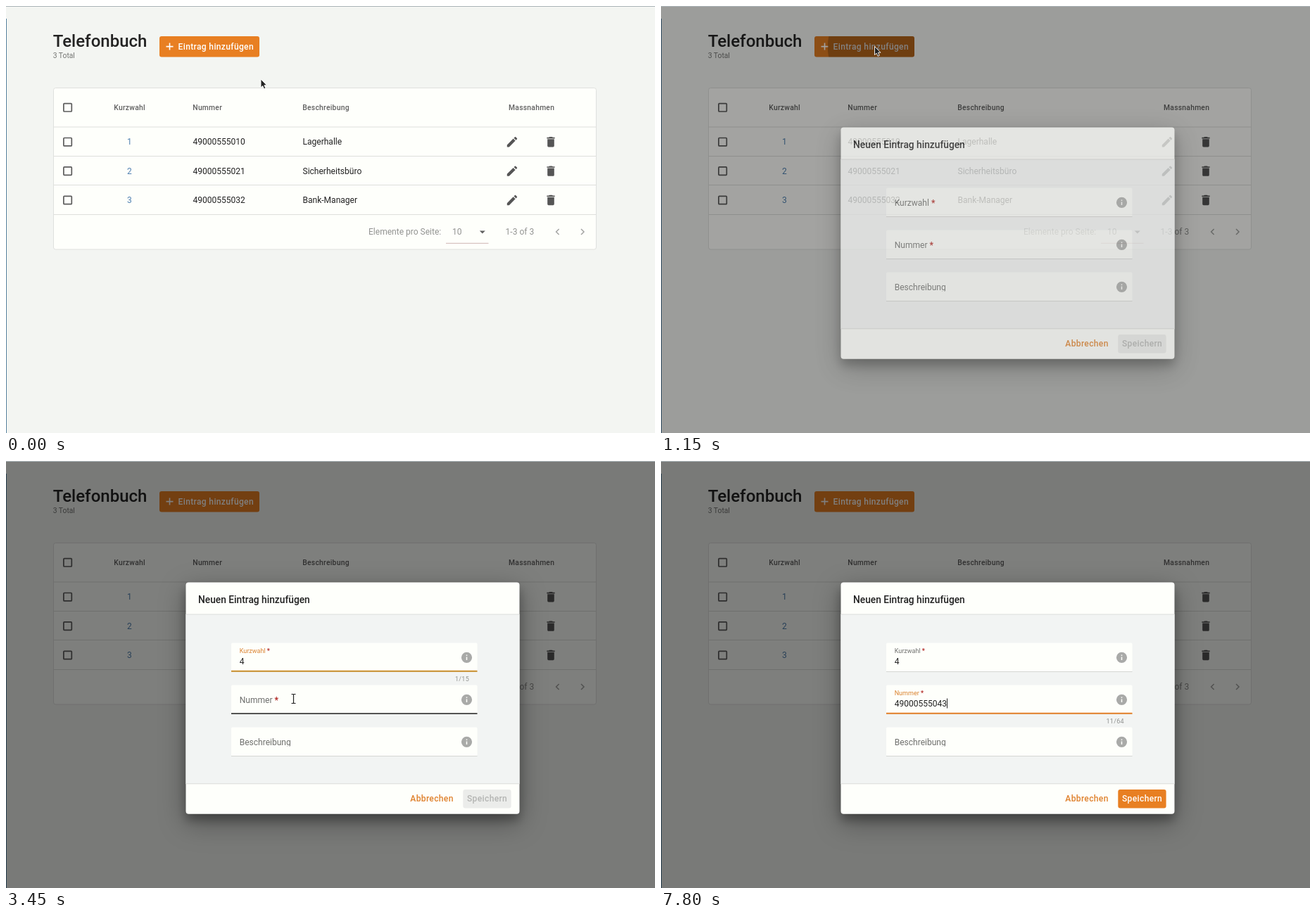
Recreate the animation shown at these times as an HTML page. Size 922 by 607 pixels, loop 8 s.

```html
<!DOCTYPE html>
<html lang="de">
<head>
<meta charset="utf-8">
<title>Telefonbuch</title>
<style>
html, body { margin: 0; width: 100%; height: 100%; overflow: hidden; background: #f3f5f2; }
svg { display: block; font: 12.04px Roboto, sans-serif; }
.medium { font-weight: 500; }
.head { font-weight: 500; font-size: 10.32px; letter-spacing: .26px; }
.button { font-weight: 500; letter-spacing: .35px; }
.dialog { filter: drop-shadow(0 9px 7px #0004) drop-shadow(0 10px 18px #0005); }
</style>
</head>
<body>
<svg id="stage" width="922" height="607" viewBox="0 0 922 607"></svg>
<script>
const LOOP = 8000, STEP = 50;
const ORANGE = '#e87f22', PAPER = '#fefffb', INK = '#222';
const ICONS = {
  edit: 'M3 17.25V21h3.75L17.81 9.94l-3.75-3.75zM20.71 7.04c.39-.39.39-1.02 0-1.41l-2.34-2.34c-.39-.39-1.02-.39-1.41 0l-1.83 1.83 3.75 3.75z',
  trash: 'M6 19c0 1.1.9 2 2 2h8c1.1 0 2-.9 2-2V7H6zM19 4h-3.5l-1-1h-5l-1 1H5v2h14z',
  info: 'M12 2a10 10 0 1 0 0 20 10 10 0 0 0 0-20zm1 15h-2v-6h2zm0-8h-2V7h2z'
};
const ROWS = [['49000555010', 'Lagerhalle'], ['49000555021', 'Sicherheitsbüro'], ['49000555032', 'Bank-Manager']];
const TYPED = '49000555043';
const KEY_TIMES = [4500, 4900, 5250, 5600, 6000, 6200, 6450, 6750, 7000, 7300, 7800];
const POINTER = [[0, 362, 104], [350, 362, 104], [400, 353, 100], [550, 353, 100], [800, 305, 58], [1100, 305, 58],
  [1200, 302, 57], [1350, 302, 57], [1800, 409, 256], [1950, 413, 281], [2900, 413, 281], [3450, 408.5, 338], [3550, 409.5, 344.5]];

const clamp = x => Math.max(0, Math.min(1, x));
const mix = (a, b, p) => a + (b - a) * p;
const ease = (t, from, to) => { const x = clamp((t - from) / (to - from)); return x * x * (3 - 2 * x); };
const blend = (a, b, p) => `color-mix(in srgb, ${b} ${p * 100}%, ${a})`;

const rect = (x, y, w, h, fill, more = '') => `<rect x="${x}" y="${y}" width="${w}" height="${h}" fill="${fill}" ${more}/>`;
const text = (x, y, s, fill, more = '') => `<text x="${x}" y="${y}" fill="${fill}" ${more}>${s}</text>`;
const line = (d, color, width = 1) => `<path d="${d}" fill="none" stroke="${color}" stroke-width="${width}"/>`;
const icon = (name, x, y, size, fill) =>
  `<path transform="translate(${x} ${y}) scale(${size}) translate(-12 -12)" d="${ICONS[name]}" fill="${fill}"/>`;

const checkbox = y => rect(81.9, y - 5.7, 11.4, 11.4, 'none', 'rx="1" stroke="#5c5c5c" stroke-width="1.7"');
const tableRow = ([number, label], i) => {
  const y = 193.2 + 41.4 * i;
  return checkbox(y) +
    text(175.5, y + 4, i + 1, '#4f80b0', 'text-anchor="middle"') +
    text(265.5, y + 4, number, INK) + text(421.5, y + 4, label, INK) +
    icon('edit', 719, y, .8, '#555') + icon('trash', 774, y, .8, '#555') +
    line(`M68 ${Math.round(y + 20.5) - .5}H838`, '#dedfdc');
};
const header = (x, s) => text(x, 148.2, s, '#606060', 'class="head"');

const PAGE = rect(0, 0, 922, 607, '#f3f5f2') + rect(0, 18, 1, 589, '#55809f') +
  text(66.7, 58, 'Telefonbuch', INK, 'class="medium" font-size="24"') +
  text(66.7, 74, '3 Total', '#747573', 'font-size="10.32"') +
  rect(67.5, 116.5, 771, 229.5, PAPER, 'rx="3" stroke="#dfe0de"') +
  checkbox(144.3) + header(153.3, 'Kurzwahl') + header(265.3, 'Nummer') +
  header(421.3, 'Beschreibung') + header(714, 'Massnahmen') +
  line('M68 172H838', '#dedfdc') + ROWS.map(tableRow).join('') +
  text(515, 325, 'Elemente pro Seite:', '#929391') + text(634, 324.5, '10', '#929391') +
  line('M625 337.3H685.5', '#cfb5b3') + '<path d="M672.8 319.5h8l-4 4z" fill="#606060"/>' +
  text(709.6, 325, '1-3 of 3', '#929391') +
  line('M785.6 317l-4 4 4 4M817 317l4 4-4 4', '#a4a5a3', 1.5);

const SHELL = rect(255.5, 172.5, 474, 329.3, PAPER, 'rx="4" class="dialog"') +
  rect(255.5, 218, 474, 241, '#f2f4f3') +
  line('M255.5 218H729.5M255.5 458.8H729.5', '#dcdddb') +
  text(273, 202.3, 'Neuen Eintrag hinzufügen', INK, 'class="medium" font-size="13.76"') +
  text(574.3, 484.3, 'Abbrechen', '#df812c', 'class="button"');

function pointerAt(t) {
  const i = POINTER.findIndex(k => k[0] > t);
  if (i < 0) return POINTER.at(-1).slice(1);
  const [a, b] = [POINTER[i - 1], POINTER[i]];
  const p = ease(t, a[0], b[0]);
  return [mix(a[1], b[1], p), mix(a[2], b[2], p)];
}

function addButton(t) {
  const radius = 108 * (1 - Math.exp(-Math.max(0, t - 1000) / 150));
  const ripple = t < 1000 ? 0 : .22 * (1 - ease(t, 1050, 1750));
  const hover = .05 * ease(t, 600, 800) * (1 - ease(t, 1350, 1600));
  return rect(218, 43, 142, 29.6, ORANGE, 'rx="3"') +
    rect(218, 43, 142, 29.6, '#000', `rx="3" opacity="${hover}"`) +
    line('M227.5 57.6h10M232.5 52.6v10', '#fff', 1.6) +
    text(244.6, 62.2, 'Eintrag hinzufügen', '#fff', 'class="button"') +
    '<clipPath id="pill"><rect x="218" y="43" width="142" height="29.6" rx="3"/></clipPath>' +
    `<circle cx="305" cy="58" r="${radius}" opacity="${ripple}" clip-path="url(#pill)"/>`;
}

function field(y, { label, required, value = '', max, focus = 0, float = 0, hover, accent, caret }) {
  const size = mix(12.04, 9.03, float);
  const star = required ? ' <tspan fill="#b02420" font-weight="700">*</tspan>' : '';
  let out = rect(320, y, 349.5, 41, PAPER, 'rx="2"') + line(`M320 ${y + 41}H669.5`, '#d5d6d4');
  if (hover) out += line(`M320 ${y + 40.5}H669.5`, INK, 1.7);
  if (focus) {
    const half = 174.75 * focus;
    out += line(`M${494.75 - half} ${y + 40.3}H${494.75 + half}`, accent, 2) +
      text(658, y + 54, `${value.length}/${max}`, '#929391',
        `text-anchor="end" font-size="9.03" letter-spacing=".3" opacity="${focus}"`);
  }
  out += text(331.7, y + mix(25.8, 14.7, float), label + star, blend('#6e6f6d', '#db8230', focus), `font-size="${size}"`) +
    text(331.7, y + 30.5, value, INK) + icon('info', 654.5, y + 20.8, .76, '#a9aaa8');
  if (!required) out += rect(331, y + 27, 80, 5, PAPER);
  if (caret) out += rect(Math.round(331.8 + value.length * 6.77), y + 19, 1, 14, INK);
  return out;
}

function dialog(t, py) {
  const first = ease(t, 2050, 2250), second = ease(t, 3650, 3850);
  const active = ease(t, 4450, 4700);
  const count = KEY_TIMES.filter(k => k <= t).length;
  return SHELL +
    field(258.5, { label: 'Kurzwahl', required: true, value: t < 2900 ? '' : '4', max: 15,
      focus: second ? 0 : first, float: first, accent: '#cb8f2c',
      hover: t >= 1850 && py < 300 && first < 1, caret: t >= 2200 && t < 3400 }) +
    field(318.5, { label: 'Nummer', required: true, value: TYPED.slice(0, count), max: 64,
      focus: second, float: second, accent: '#e5812a',
      hover: py > 318 && second < 1, caret: t >= 3800 && (t < 7500 || t >= 7800) }) +
    field(378.5, { label: 'Beschreibung' }) +
    rect(649.3, 467, 68.3, 26.6, blend('#ebecea', ORANGE, active), 'rx="3"') +
    text(655, 484.3, 'Speichern', blend('#b3b4b2', '#fff', active), 'class="button"');
}

function pointer(t, x, y) {
  if (t >= 4150) return '';
  const beam = t >= 1850 && (y < 299 || y > 318);
  const shape = beam
    ? `<path d="M-3 -6.5h2q1 0 1 1q0 -1 1 -1h2M0 -5.5v11M-3 6.5h2q1 0 1 -1q0 1 1 1h2" fill="none" stroke="${INK}" stroke-width="1.2"/>`
    : `<path d="M0 0V12l2.7-2.4 1.9 4.2 2.2-1-1.9-4.1h3.6z" fill="${INK}" stroke="#fff" stroke-width=".9"/>`;
  return `<g transform="translate(${x} ${y})">${shape}</g>`;
}

const stage = document.getElementById('stage');
function render(t) {
  const [x, y] = pointerAt(t);
  const shown = ease(t, 1000, 1230);
  stage.innerHTML = PAGE + addButton(t) +
    rect(0, 1, 922, 606, '#000', `opacity="${shown * .5}"`) +
    rect(0, 0, 922, 1, '#abb4b8') +
    (shown ? `<g opacity="${shown}">${dialog(t, y)}</g>` : '') + pointer(t, x, y);
}

let last = -1;
function tick() {
  const t = Math.floor(performance.now() % LOOP / STEP) * STEP;
  if (t !== last) render(last = t);
  requestAnimationFrame(tick);
}
tick();
</script>
</body>
</html>
```
